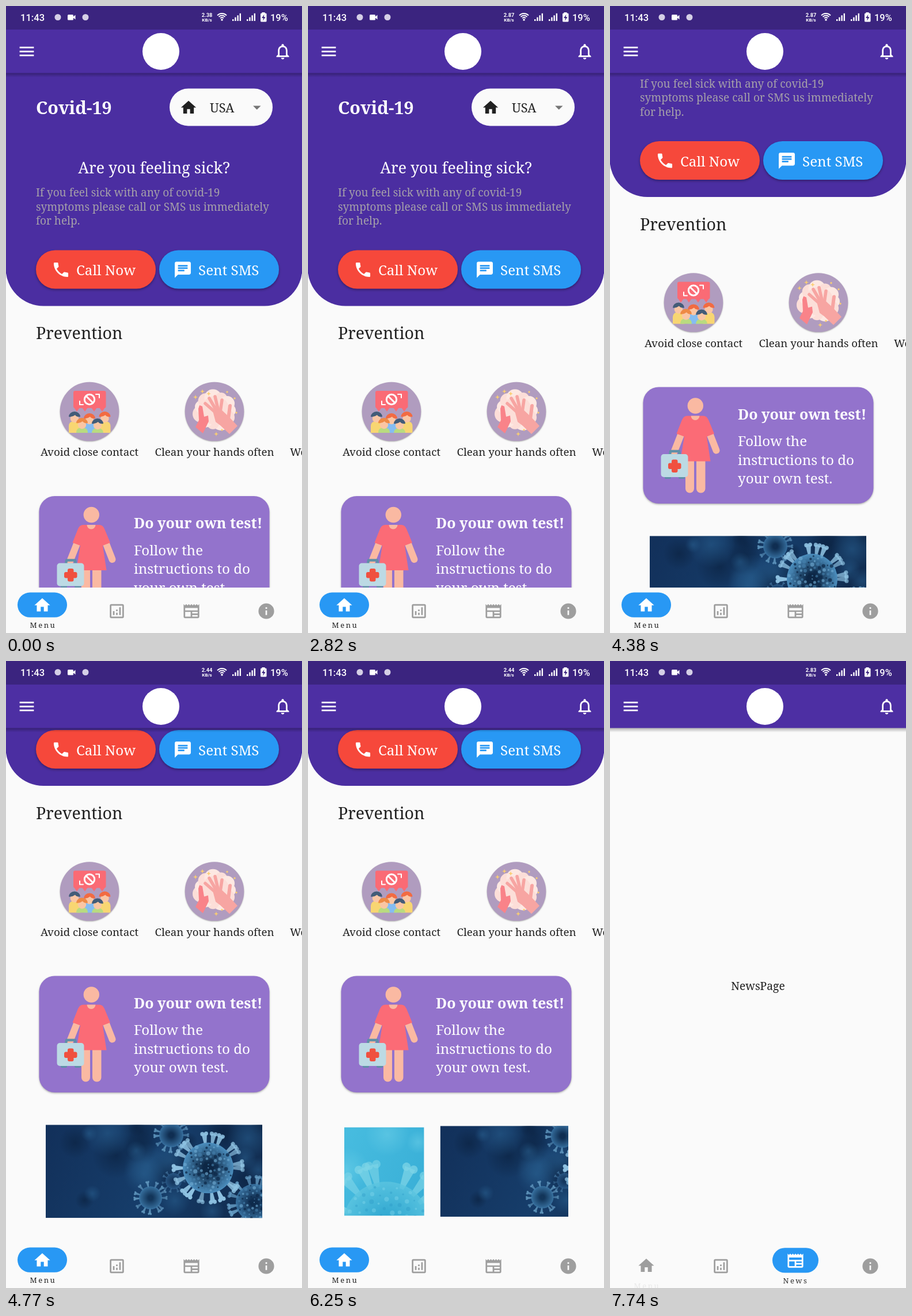
Animation of 514 by 1090 pixels, one loop 8000 ms. Source, as an HTML page with a canvas:

```html
<!DOCTYPE html>
<html lang="en">
<head>
<meta charset="utf-8">
<title>Health app</title>
<style>
html, body { margin: 0; width: 100%; height: 100%; overflow: hidden; background: #fafafa; }
canvas { display: block; width: 514px; height: 1090px; }
</style>
</head>
<body>
<canvas id="stage"></canvas>
<script>
const W = 514, H = 1090, LOOP = 8000;
const PURPLE = '#4b2ea1', BLUE = '#2898f4', PAPER = '#fafafa', INK = '#212121', GREY = '#9e9e9e';
const SLAB = '"Noto Serif", serif', SANS = 'Roboto, sans-serif';
const canvas = document.getElementById('stage');
const c = canvas.getContext('2d');
const dpr = window.devicePixelRatio || 1;
canvas.width = W * dpr;
canvas.height = H * dpr;

// Each step changes only the listed parts of the state, at once.
const steps = [
  [0, { scroll: 0, slide: 0, rate: '2.38', list: false, touch: null, news: 0, menu: 1 }],
  [1120, { list: true }],
  [1810, { rate: '2.87' }],
  [2230, { list: false }],
  [3280, { scroll: 188, slide: .61, touch: [410, 540, .45] }],
  [3630, { scroll: 189.5, slide: 1, touch: null }],
  [4770, { scroll: 304.5, rate: '2.44' }],
  [5130, { slide: .85, touch: [238, 908, 1] }],
  [5510, { slide: .37, touch: [425, 912, 1] }],
  [5880, { slide: 0, touch: null }],
  [6250, { slide: .6 }],
  [6430, { slide: 1 }],
  [6940, { touch: [337, 1064, .4] }],
  [7370, { touch: null, news: .6, menu: .25 }],
  [7740, { news: .93, menu: .08, rate: '2.83' }]
];

const icons = {
  home: 'M10 20v-6h4v6h5v-8h3L12 3 2 12h3v8z',
  call: 'M6.62 10.79c1.44 2.83 3.76 5.14 6.59 6.59l2.2-2.2c.27-.27.67-.36 1.02-.24 1.12.37 2.33.57 3.57.57.55 0 1 .45 1 1V20c0 .55-.45 1-1 1-9.39 0-17-7.61-17-17 0-.55.45-1 1-1h3.5c.55 0 1 .45 1 1 0 1.25.2 2.45.57 3.57.11.35.03.74-.25 1.02z',
  chat: 'M20 2H4C2.9 2 2 2.9 2 4V22l4-4h14c1.1 0 2-.9 2-2V4c0-1.1-.9-2-2-2zM6 9h12v2H6zM14 14H6v-2h8zM18 8H6V6h12z',
  bars: 'M3 18h18v-2H3zM3 13h18v-2H3zM3 6v2h18V6z',
  bell: 'M12 22c1.1 0 2-.9 2-2h-4c0 1.1.9 2 2 2zM18 16v-5c0-3.07-1.63-5.64-4.5-6.32V4c0-.83-.67-1.5-1.5-1.5s-1.5.67-1.5 1.5v.68C7.64 5.36 6 7.92 6 11v5l-2 2v1h16v-1zM16 17H8v-6c0-2.48 1.51-4.5 4-4.5s4 2.02 4 4.5z',
  chart: 'M5 3h14a2 2 0 0 1 2 2v14a2 2 0 0 1-2 2H5a2 2 0 0 1-2-2V5a2 2 0 0 1 2-2zM5 5v14h14V5zM7 12h2v5H7zM11 14h2v3h-2zM11 10h2v2h-2zM15 7h2v10h-2z',
  news: 'M22 3l-1.67 1.67L18.67 3 17 4.67 15.33 3l-1.66 1.67L12 3l-1.67 1.67L8.67 3 7 4.67 5.33 3 3.67 4.67 2 3v16a2 2 0 0 0 2 2h16a2 2 0 0 0 2-2zM11 19H4v-6h7zM20 19h-7v-2h7zM20 15h-7v-2h7zM20 11H4V8h16z',
  info: 'M12 2a10 10 0 1 0 0 20 10 10 0 0 0 0-20zM13 17h-2v-6h2zM13 9h-2V7h2z'
};
for (const k in icons) icons[k] = new Path2D(icons[k]);

function icon(name, x, y, color, size = 33) {
  c.save();
  c.translate(x - size / 2, y - size / 2);
  c.scale(size / 24, size / 24);
  c.fillStyle = color;
  c.fill(icons[name], 'evenodd');
  c.restore();
}

function text(str, x, y, size, color, o = {}) {
  c.font = `${o.weight || 400} ${size}px ${o.font || SLAB}`;
  c.textAlign = o.align || 'left';
  c.letterSpacing = (o.spacing || 0) + 'px';
  c.fillStyle = color;
  c.fillText(str, x, y);
  c.letterSpacing = '0px';
}

function box(x, y, w, h, r, color) {
  c.beginPath();
  c.roundRect(x, y, w, h, r);
  c.fillStyle = color;
  c.fill();
}

function disc(x, y, r, color) {
  c.beginPath();
  c.arc(x, y, r, 0, 7);
  c.fillStyle = color;
  c.fill();
}

function poly(points, color) {
  c.beginPath();
  points.forEach(p => c.lineTo(...p));
  c.closePath();
  c.fillStyle = color;
  c.fill();
}

function line(points, width, color, cap = 'round') {
  c.beginPath();
  points.forEach(p => c.lineTo(...p));
  c.lineWidth = width;
  c.lineCap = cap;
  c.lineJoin = 'round';
  c.strokeStyle = color;
  c.stroke();
}

function shaded(blur, dy, alpha, draw) {
  c.save();
  c.shadowColor = `rgba(0,0,0,${alpha})`;
  c.shadowBlur = blur * dpr;
  c.shadowOffsetY = dy * dpr;
  draw();
  c.restore();
}

function random(seed) {
  const v = Math.sin(seed * 12.9898) * 43758.5453;
  return v - Math.floor(v);
}

function statusBar(rate) {
  box(0, 0, W, 41, 0, '#3b247f');
  const o = { font: SANS, weight: 500 }, tiny = { font: SANS, weight: 700, align: 'center' };
  text('11:43', 25, 26, 16.6, '#fff', o);
  disc(90, 19.5, 5.5, '#d5cfe6');
  disc(138, 19.5, 5.5, '#d5cfe6');
  box(107, 15, 10, 9.5, 1.5, '#fff');
  poly([[116, 19.5], [120.5, 15.5], [120.5, 23.5]], '#fff');
  text(rate, 349, 19, 9.3, '#fff', tiny);
  text('KB/s', 349, 27.3, 8, '#fff', tiny);
  c.strokeStyle = '#fff';
  c.lineWidth = 1.8;
  c.lineCap = 'butt';
  for (const r of [4, 7.5, 11]) {
    c.beginPath();
    c.arc(375, 24, r, -Math.PI * .76, -Math.PI * .24);
    c.stroke();
  }
  disc(375, 24, 1.8, '#fff');
  for (const x of [393, 418])
    for (let i = 0; i < 4; i++) box(x + i * 4.2, 23 - i * 3.4, 2.4, 3 + i * 3.4, 0, '#fff');
  box(444.5, 11, 5, 3, 0, '#fff');
  box(442, 12.5, 10.5, 15, 1.5, '#fff');
  poly([[448.5, 14.5], [444, 21], [447, 21], [446, 26], [450.5, 19], [447.6, 19]], '#3b247f');
  text('19%', 459, 26, 16.4, '#fff', o);
}

function appBar() {
  const g = c.createLinearGradient(0, 116, 0, 124);
  g.addColorStop(0, 'rgba(0,0,0,.3)');
  g.addColorStop(1, 'rgba(0,0,0,0)');
  box(0, 116, W, 8, 0, g);
  box(0, 41, W, 75.5, 0, '#4d2fa3');
  icon('bars', 36, 79, '#fff');
  icon('bell', 480.5, 79, '#fff');
  disc(269, 79, 32, '#fff');
}

function tab(x, name, label, p) {
  const y = 1052 - 10.3 * p;
  if (p > .3) box(x - 43 * p, y - 22.2, 86 * p, 43.3, 21.6, BLUE);
  icon(name, x, y, p > .3 ? '#fff' : GREY, 32.6);
  if (!label) return;
  c.globalAlpha = p;
  text(label, x - 21.5, 1081 + (1 - p) * 11, 13, INK, { spacing: 2.5 });
  c.globalAlpha = 1;
}

function navBar(s) {
  box(0, 1011, W, 79, 0, PAPER);
  tab(63, 'home', 'Menu', s.menu);
  tab(192.5, 'chart', '', 0);
  tab(322, 'news', 'News', s.news);
  tab(452, 'info', '', 0);
}

function pillButton(x, color, name, label, labelX) {
  shaded(4, 2, .35, () => box(x, 424.5, 208, 67, 33.5, color));
  icon(name, x + (name === 'call' ? 43.5 : 41), 458.5, '#fff', 33.5);
  text(label, labelX, 468, 24.2, '#fff');
}

function hero() {
  box(-.5, 0, 515, 521.5, [0, 0, 65.5, 65.5], PURPLE);
  text('Covid-19', 52, 188, 30.5, '#fff', { weight: 700 });
  box(284, 143.5, 179, 65, 32.5, PAPER);
  icon('home', 317, 176.5, INK, 31.5);
  text('USA', 354, 185, 21.8, INK);
  poly([[429, 173.5], [442.5, 173.5], [435.7, 180.3]], '#757575');
  text('Are you feeling sick?', 257, 291, 26.8, '#fff', { align: 'center' });
  ['If you feel sick with any of covid-19',
   'symptoms please call or SMS us immediately',
   'for help.'].forEach((s, i) => text(s, 52, 331 + i * 24.5, 19, '#a5a0a9'));
  pillButton(52, '#f6483b', 'call', 'Call Now', 122);
  pillButton(266, BLUE, 'chat', 'Sent SMS', 334);
}

function person(x, y, hair, shirt) {
  box(x - 10, y + 9, 20, 27, [8, 8, 0, 0], shirt);
  disc(x, y + 4, 7.2, '#fac6a4');
  c.beginPath();
  c.ellipse(x, y + 1, 10, 9, 0, Math.PI, 0);
  c.quadraticCurveTo(x + 4, y + 2, x + 1, y - 2);
  c.quadraticCurveTo(x - 4, y + 2, x - 10, y + 1);
  c.fillStyle = hair;
  c.fill();
}

function crowd() {
  box(117, 669, 56.5, 30, 3, '#fa6b75');
  for (const x of [123, 137, 153, 167]) poly([[x - 5, 698], [x + 5, 698], [x, 705]], '#fa6b75');
  c.beginPath();
  c.arc(145, 684, 8.7, 0, 7);
  c.lineWidth = 3;
  c.strokeStyle = '#fff';
  c.stroke();
  line([[139, 678], [151, 690]], 3, '#fff', 'butt');
  line([[128, 687], [128, 693], [134, 693]], 2, '#fff');
  line([[156, 675], [162, 675], [162, 681]], 2, '#fff');
  c.save();
  c.beginPath();
  c.rect(100, 660, 90, 82);
  c.clip();
  const red = '#f26b42', navy = '#435c78', gold = '#f8d672', green = '#b9db80';
  person(119, 713, navy, gold);
  person(171.5, 713, red, gold);
  person(145, 716, red, '#86bdf1');
  person(132, 724, '#ee8a45', green);
  person(159, 725, navy, green);
  c.restore();
}

function hands() {
  const foam = '#fcded8', skin = '#f7a5a2';
  for (let i = 0; i < 11; i++) {
    const a = i / 11 * 2 * Math.PI;
    disc(363 + 25 * Math.cos(a), 703 + 22 * Math.sin(a), 11 + i % 3 * 2, i % 2 ? foam : '#fde8e2');
  }
  disc(363, 703, 25, foam);
  poly([[329, 732], [342, 743], [352, 722], [351, 712], [344, 714], [341, 696], [336, 694], [334, 700], [335, 720]], '#f98389');
  [[346, 691], [353, 682], [363, 679], [375, 685]].forEach(tip => line([tip, [371, 713]], 5.5, skin));
  line([[389, 695], [386, 718], [374, 719]], 6, skin);
  poly([[359, 704], [372, 700], [387, 714], [402, 730], [388, 744], [372, 729], [364, 723]], skin);
  [[341, 670], [384, 671], [329, 680], [397, 682], [352, 674], [375, 737], [365, 744], [400, 707]]
    .forEach(([x, y], i) => {
      const r = i % 2 ? 2 : 4;
      poly([[x, y - r], [x + 1, y - 1], [x + r, y], [x + 1, y + 1], [x, y + r], [x - 1, y + 1], [x - r, y], [x - 1, y - 1]], '#fbcf70');
    });
}

function advice(x, label, draw) {
  shaded(2, 1, .3, () => disc(x, 705, 51.3, '#b09cbf'));
  c.save();
  c.beginPath();
  c.arc(x, 705, 51.3, 0, 7);
  c.clip();
  draw();
  c.restore();
  text(label, x, 782, 18.7, INK, { align: 'center' });
}

function nurse() {
  const skin = '#fab9a2', dress = '#fb6b76', steel = '#5f8fa8';
  box(131, 970, 15, 66, 7.5, skin);
  box(150, 970, 15.5, 66, 7.5, skin);
  line([[125, 930], [110, 968]], 12, skin);
  line([[172, 930], [184.5, 962]], 12, skin);
  c.beginPath();
  c.moveTo(134, 902);
  c.lineTo(162, 902);
  c.quadraticCurveTo(168, 902, 171, 909);
  c.lineTo(181, 933);
  c.lineTo(168, 938);
  c.lineTo(174.5, 981);
  c.lineTo(122, 981);
  c.lineTo(129, 938);
  c.lineTo(115.5, 933);
  c.lineTo(125, 909);
  c.quadraticCurveTo(128, 902, 134, 902);
  c.fillStyle = dress;
  c.fill();
  c.beginPath();
  c.arc(148, 902, 7.5, 0, Math.PI);
  c.fillStyle = skin;
  c.fill();
  disc(148.3, 884.5, 13.7, skin);
  line([[104, 970], [105, 963.5], [120, 963.5], [121, 970]], 4.5, steel);
  box(95, 1005, 11, 6.5, 2, steel);
  box(119, 1005, 11, 6.5, 2, steel);
  box(88.5, 968.5, 47, 40, 5, '#bcdae4');
  box(107, 978, 10.5, 22.5, 3, '#f0503f');
  box(101, 984, 22.5, 10.5, 3, '#f0503f');
}

function testCard() {
  shaded(3, 1.5, .3, () => box(57.5, 852, 400, 202.5, 27, '#9373cc'));
  nurse();
  text('Do your own test!', 222, 908, 25, '#fff', { weight: 700 });
  ['Follow the', 'instructions to do', 'your own test.']
    .forEach((s, i) => text(s, 222, 954.5 + i * 32.5, 24.2, '#fff'));
}

function gradient(...colors) {
  const g = c.createLinearGradient(0, 0, 376, 162);
  colors.forEach((col, i) => g.addColorStop(i / (colors.length - 1), col));
  box(0, 0, 376, 162, 0, g);
}

function haze(n, seed, rgb, alpha) {
  for (let i = 0; i < n; i++) {
    const x = 376 * random(seed + i), y = 162 * random(seed + i + 50), r = 14 + 28 * random(seed + i + 90);
    const g = c.createRadialGradient(x, y, 0, x, y, r);
    g.addColorStop(0, `rgba(${rgb},${alpha})`);
    g.addColorStop(1, `rgba(${rgb},0)`);
    disc(x, y, r, g);
  }
}

// A ball with stalks; each stalk ends in two lobes.
function virus(x, y, r, n, reach, core, rim, spike) {
  for (let i = 0; i < n; i++) {
    c.save();
    c.translate(x, y);
    c.rotate(i / n * 2 * Math.PI + .3 * random(i));
    c.globalAlpha *= .6 + .4 * random(i + 7);
    const e = r * reach, w = (reach - 1) * r * .3;
    poly([[r * .9, -w * .4], [e, -w], [e, w], [r * .9, w * .4]], spike);
    disc(e, -w * .7, w * .75, spike);
    disc(e, w * .7, w * .75, spike);
    c.restore();
  }
  const g = c.createRadialGradient(x, y, r * .2, x, y, r);
  g.addColorStop(0, core);
  g.addColorStop(1, rim);
  disc(x, y, r, g);
}

// Small marks spread evenly over a ball.
function grain(x, y, r, n, size, colors) {
  for (let i = 0; i < n; i++) {
    const d = r * Math.sqrt(i / n), a = i * 2.4;
    disc(x + d * Math.cos(a), y + d * Math.sin(a), size * (.5 + random(i)), colors[i % colors.length]);
  }
}

function cyanPhoto() {
  gradient('#66cbe3', '#48bde0', '#38aed6');
  haze(10, 3, '130,220,238', .35);
  c.globalAlpha = .5;
  virus(95, 30, 34, 9, 1.6, '#4fbfde', '#68cce4', '#84d8e9');
  c.globalAlpha = .8;
  virus(307, 180, 80, 17, 1.42, '#2fa6cf', '#5cc5e0', '#7fd6e8');
  c.globalAlpha = 1;
  grain(307, 180, 76, 90, 3, ['rgba(130,216,235,.4)', 'rgba(40,150,195,.35)']);
}

function darkPhoto() {
  gradient('#12305a', '#163d6a', '#10294b');
  haze(14, 11, '12,36,68', .75);
  haze(14, 30, '42,98,146', .5);
  c.globalAlpha = .6;
  virus(222, 98, 14, 11, 1.4, '#16385f', '#33689a', '#4679a3');
  c.globalAlpha = .85;
  virus(218, 18, 21, 13, 1.4, '#0e2b4d', '#3a75a5', '#5f96be');
  virus(182, 127, 20, 13, 1.4, '#123457', '#3d79a8', '#649bc2');
  virus(362, 135, 32, 15, 1.4, '#0e2b4d', '#3f7dad', '#6aa3cb');
  c.globalAlpha = 1;
  virus(282, 75, 44, 19, 1.36, '#0d2745', '#4c8fbf', '#8fc3e3');
  const marks = ['rgba(110,170,210,.65)', 'rgba(14,42,74,.75)', 'rgba(70,130,175,.6)'];
  grain(282, 75, 42, 100, 2.4, marks);
  grain(362, 135, 30, 50, 2, marks);
}

function carousel(slide) {
  c.save();
  c.beginPath();
  c.rect(63, 1100, 389, 185);
  c.clip();
  [cyanPhoto, darkPhoto].forEach((photo, i) => {
    const d = i - slide;
    if (Math.abs(d) >= 1) return;
    const k = 1 - Math.pow(Math.abs(d) * .3, 1.73);
    c.save();
    c.translate(257 + d * 389.5, 1191.8);
    c.scale(k, k);
    c.translate(-188, -81);
    c.beginPath();
    c.rect(0, 0, 376, 162);
    c.clip();
    photo();
    c.restore();
  });
  c.restore();
}

function homePage(s) {
  c.save();
  c.beginPath();
  c.rect(0, 116, W, 895);
  c.clip();
  c.translate(0, -s.scroll);
  hero();
  text('Prevention', 52, 579, 28.6, INK);
  advice(145, 'Avoid close contact', crowd);
  advice(362, 'Clean your hands often', hands);
  text('Wear a mask', 493, 782, 18.7, INK);
  testCard();
  carousel(s.slide);
  c.restore();
}

function countryList() {
  shaded(14, 5, .5, () => box(311.5, 133, 173, 280.5, 3, PAPER));
  ['USA', 'Canada', 'Brazil', 'England']
    .forEach((s, i) => text(s, 333, 185 + i * 64.8, 21.6, INK));
}

function touchDot([x, y, strength]) {
  const firm = strength === 1;
  disc(x, y, 12, firm ? 'rgba(222,224,230,.88)' : 'rgba(248,248,251,.65)');
  c.globalAlpha = strength;
  c.beginPath();
  c.arc(x, y, 12.2, 0, 7);
  c.lineWidth = 1.6;
  c.strokeStyle = firm ? '#a8853c' : '#fbb928';
  c.stroke();
  c.globalAlpha = 1;
}

function draw() {
  const t = performance.now() % LOOP;
  const s = Object.assign({}, ...steps.filter(([at]) => at <= t).map(([, part]) => part));
  c.setTransform(dpr, 0, 0, dpr, 0, 0);
  box(0, 0, W, H, 0, PAPER);
  if (s.news) text('NewsPage', 257, 572, 19.3, INK, { align: 'center' });
  else homePage(s);
  appBar();
  statusBar(s.rate);
  navBar(s);
  if (s.list) countryList();
  if (s.touch) touchDot(s.touch);
  requestAnimationFrame(draw);
}
draw();
</script>
</body>
</html>
```
